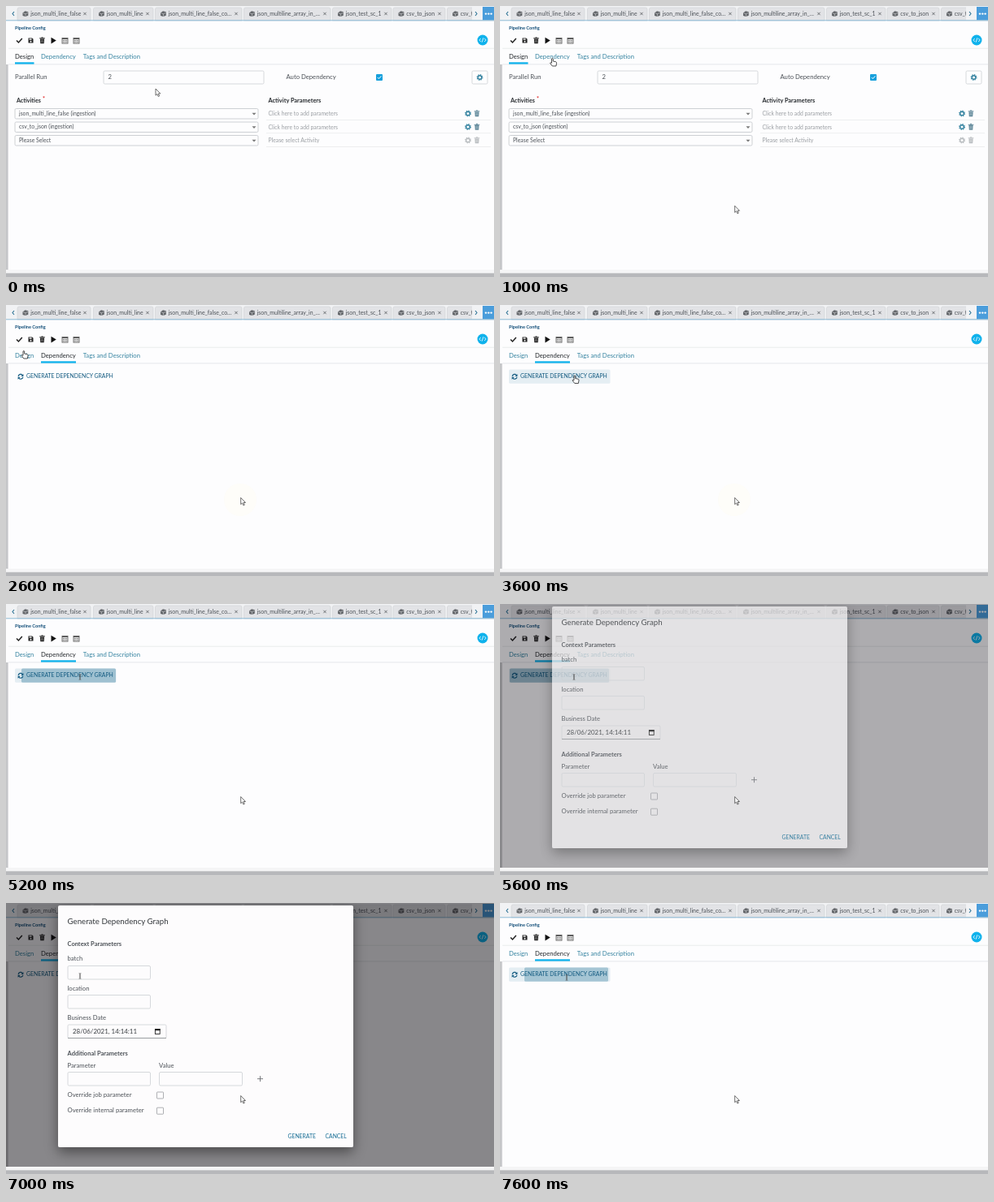
These frames come from a looping animation (600x334 px, 8 s). An HTML page:

```html
<!DOCTYPE html>
<html lang="en">
<head>
<meta charset="utf-8">
<style>
  html, body { margin: 0; width: 100%; height: 100%; overflow: hidden; background: #fdfdfe; }
  svg { display: block; width: 100vw; height: 100vh; font-family: Lato, sans-serif; }
  text { white-space: pre; }
</style>
</head>
<body>
<svg id="stage" viewBox="0 0 600 334" preserveAspectRatio="none"></svg>
<script>
const LOOP = 8000;
const TEAL = '#3583a0', INK = '#4c5157', DARK = '#25292d', NAVY = '#125a80', CYAN = '#0fb2ec';

const text = (x, y, str, size = 7.7, fill = INK, extra = '') =>
  `<text x="${x}" y="${y}" font-size="${size}" fill="${fill}" ${extra}>${str}</text>`;
const bold = (x, y, str, size = 7.5, fill = DARK) => text(x, y, str, size, fill, 'font-weight="700"');
const rect = (x, y, w, h, fill, extra = '') =>
  `<rect x="${x}" y="${y}" width="${w}" height="${h}" fill="${fill}" ${extra}/>`;
const line = (d, stroke, width = 1, extra = '') =>
  `<path d="${d}" fill="none" stroke="${stroke}" stroke-width="${width}" ${extra}/>`;
const shape = (d, fill, extra = '') => `<path d="${d}" fill="${fill}" ${extra}/>`;
const at = (x, y, body, extra = '') => `<g transform="translate(${x} ${y})" ${extra}>${body}</g>`;
const group = (id, body) => `<g id="${id}">${body}</g>`;
const field = (x, y, w, h, stroke = '#ccd0d3') =>
  rect(x + .5, y + .5, w - 1, h - 1, 'none', `rx="1.5" stroke="${stroke}" stroke-width=".8"`);

// Icons are centred on their own origin.
const gear = color =>
  `<circle r="2.3" fill="none" stroke="${color}" stroke-width="1.4"/>` +
  `<circle r="3.4" fill="none" stroke="${color}" stroke-width="1.1" stroke-dasharray="1.4 1.27"/>`;
const trash = color =>
  shape('M-2.6 -2h5.2l-.4 5.7h-4.4z', color) + line('M-3.3 -2.7h6.6M-1 -3.6h2', color, 1) +
  line('M-.8 -1v3.6M.8 -1v3.6', '#fff', .4);
const refresh = line('M-2.9 -.5A3 3 0 0 1 2.4 -1.8M2.9 .5A3 3 0 0 1 -2.4 1.8', NAVY, 1.2) +
  shape('M3.4 -3.4v3h-3zM-3.4 3.4v-3h3z', NAVY);
const calendar = rect(-3.5, -3, 7, 6.6, '#e8e8e8', 'stroke="#666" stroke-width=".9"') +
  line('M-3.5 -2.2h7', '#555', 1.4) + line('M-2.7 0h5.4M-2.7 1.8h5.4', '#777', 1, 'stroke-dasharray="1 .5"');
const jobIcon = shape('M-3.5 -1l3 -2.2 3.8 1v4.4l-3.4 1.4 -3.4 -1z', '#63666a') +
  line('M-3 -.6l3 .8 3 -1.4M0 .2v3', '#d4d5d7', .6);
const close = line('M-1.7 -1.7L1.7 1.7M1.7 -1.7L-1.7 1.7', '#55585c', .8);

function tabBar() {
  const tabs = [
    ['json_multi_line_false', 24, 97], ['json_multi_line', 117.5, 174],
    ['json_multi_line_false_co…', 193.5, 283], ['json_multiline_array_in_…', 302.5, 392],
    ['json_test_sc_1', 411.5, 467], ['csv_to_json', 486, 533], ['csv_t', 552.5, 600]
  ];
  return rect(0, 0, 600, 18, '#f1f2f4') + tabs.map(([name, icon, x]) =>
    shape(`M${icon - 10} 18V4q0 -2 2 -2H${x + 5}q2 0 2 2V18z`, '#e2e3e6', 'stroke="#cfd1d4" stroke-width=".6"') +
    at(icon, 9.5, jobIcon) + text(icon + 6.2, 11.5, name, 6.9) + at(x, 9.5, close)).join('') +
    rect(573, 0, 27, 17.5, '#f1f2f4') +
    line('M10 7l-2 2.5 2 2.5M577 7l2 2.5 -2 2.5', '#2d7396', 1.1) +
    rect(586, 1, 14, 16.5, '#4a9ddb') +
    [590, 593.3, 596.6].map(x => `<circle cx="${x}" cy="9.6" r="1.2" fill="#fff"/>`).join('') +
    rect(0, 17.3, 600, 1, '#8dbbd6');
}

function toolbar() {
  return bold(11, 29.3, 'Pipeline Config', 5.6, '#14507a') +
    line('M13 42.5l2.4 2.5 4.4 -5', '#222', 1.5) +
    at(30.5, 42.5, shape('M-3 -3h4.7l1.3 1.3v4.7h-6z', '#222') + rect(-1.9, -2.2, 3, 1.4, '#fff') +
      '<circle cy="1.2" r="1" fill="#fff"/>') +
    at(44.5, 42.5, trash('#222')) + shape('M55.5 38.8l6.3 3.8 -6.3 3.8z', '#111') +
    at(72.5, 42.5, calendar) + at(86.5, 42.5, calendar) +
    `<circle cx="586" cy="42" r="6.5" fill="${CYAN}"/>` +
    line('M583.8 40l-2 2 2 2M588.2 40l2 2 -2 2M586.9 39.3l-1.8 5.4', '#fff', .8) +
    rect(3, 51.8, 597, .7, '#e0e3e6') + rect(3, 71.6, 597, .7, '#dadde0');
}

function designPage() {
  const rows = [['json_multi_line_false (ingestion)', 126], ['csv_to_json (ingestion)', 142.5], ['Please Select', 159]];
  return text(11, 90, 'Parallel Run') + field(119.5, 79.5, 198, 17) + text(125.5, 90.3, '2') +
    text(344.5, 90, 'Auto Dependency') + rect(455, 84, 8, 8, '#16a0dc', 'rx="1"') +
    line('M456.8 88l1.6 1.6 3 -3.3', '#fff', 1) +
    field(572.5, 79.5, 20, 17) + at(582.5, 88, gear(TEAL)) +
    bold(13, 119, 'Activities', 7.1) + bold(45, 117, '*', 7, '#e02020') +
    bold(322.5, 119, 'Activity Parameters', 7.4) +
    rows.map(([name, y], i) => {
      const empty = i === 2, tint = empty ? '#b9bdc0' : TEAL;
      return field(10.5, y, 300, 13.5, '#c2c6c9') + text(16, y + 8.8, name, 6.85) +
        shape(`M302.5 ${y + 5.8}h5l-2.5 2.8z`, '#777') +
        text(322.5, y + 9.3, empty ? 'Please select Activity' : 'Click here to add parameters', 6.8, '#9a9ea2') +
        at(568, y + 6.5, gear(tint)) + at(579, y + 6.5, trash(empty ? '#b9bdc0' : '#5f8799')) +
        rect(320, y + 14, 276, .6, '#e3e5e7');
    }).join('');
}

function dependencyPage() {
  return rect(11, 79.5, 124.5, 17.3, '#e5eef3', 'id="hover" rx="1.5"') +
    rect(19, 79.5, 116, 17.3, '#9fc1d1', 'id="press" rx="1.5"') +
    at(18, 88.3, refresh) + text(25, 90.3, 'GENERATE DEPENDENCY GRAPH', 6.85, NAVY);
}

function dialogContent() {
  const check = y => rect(185.5, y, 8, 8, 'none', 'rx=".6" stroke="#8b8f93" stroke-width=".7"');
  return text(75.5, 25.7, 'Generate Dependency Graph', 9.7, '#34383c') +
    bold(75.5, 53, 'Context Parameters', 7.5, INK) + text(75.5, 71.3, 'batch') + field(75.5, 77, 102.5, 17.5) +
    text(75.5, 107.8, 'location') + field(75.5, 113, 102.5, 17.5) +
    text(75.5, 144, 'Business Date') + field(75.5, 149.5, 122, 17.5) +
    rect(76, 166, 121, .8, '#8b8f93') + text(82, 160.5, '28/06/2021, 14:14:11', 7.9, '#383c40') +
    rect(183.4, 155.6, 5.8, 5.8, 'none', 'stroke="#222" stroke-width=".9"') + rect(183, 155, 6.6, 2.2, '#222') +
    bold(75.5, 188, 'Additional Parameters', 7.5, INK) +
    text(75.5, 202.6, 'Parameter') + text(188, 202.6, 'Value') +
    field(75.5, 208, 102.5, 17.5) + field(188, 208, 103, 17.5) +
    line('M309 216.7h7M312.5 213.2v7', '#6a6e72', .9) +
    text(75.5, 239, 'Override job parameter') + check(233) +
    text(75.5, 258.4, 'Override internal parameter') + check(252.2) +
    text(346.5, 290, 'GENERATE', 6.8, '#146c94') + text(392.5, 290, 'CANCEL', 6.8, '#146c94');
}

const arrow = shape('M0 0v8.2l1.9 -1.7 1.3 3 1.4 -.6 -1.3 -2.9h2.5z', '#fff', 'stroke="#333" stroke-width=".7"');
const hand = shape('M-1 0q1 -1.2 1.7 0v3l3.5 .8q1 .4 .8 1.6l-.6 3.6h-4.6l-2.8 -3.6q.2 -1.2 2 -.2z',
  '#fff', 'stroke="#222" stroke-width=".8"');
const ibeam = line('M-1.3 -3.4q1.3 0 1.3 .8v5.2q0 .8 -1.3 .8M1.3 -3.4q-1.3 0 -1.3 .8v5.2q0 .8 1.3 .8', '#555', .7);

const stage = document.getElementById('stage');
stage.innerHTML =
  `<defs><filter id="shadow" x="-15%" y="-15%" width="130%" height="130%">
    <feDropShadow dx="0" dy="6" stdDeviation="8" flood-opacity=".45"/></filter></defs>` +
  rect(0, 0, 600, 334, '#fdfdfe') + tabBar() + toolbar() +
  text(11, 64.5, 'Design', 7.7, TEAL, 'id="designTab"') +
  text(43, 64.5, 'Dependency', 7.7, TEAL, 'id="dependencyTab"') +
  text(94.7, 64.5, 'Tags and Description', 7.7, TEAL) +
  rect(11, 69.3, 23.5, 2.3, CYAN, 'id="underline"') +
  group('design', designPage()) + group('dependency', dependencyPage()) +
  rect(0, 72, 2.6, 253, '#c5c6c8') +
  rect(0, 0, 600, 325, '#060307', 'id="shade"') +
  rect(64, 3, 363, 298, '#fdfcfd', 'id="panel" rx="2" filter="url(#shadow)"') +
  group('content', dialogContent()) +
  rect(0, 325, 600, 4.3, '#f5f5f6') + rect(0, 329.3, 600, 4.7, '#b7b8bb') +
  '<circle id="halo" cx="288" cy="240" r="20" fill="#fffbe6" opacity=".25"/>' +
  group('idleArrow', arrow) +
  group('pointer', group('arrow', arrow) + group('hand', hand) + group('ibeam', ibeam));

const el = Object.fromEntries([...stage.querySelectorAll('[id]')].map(node => [node.id, node]));
const set = (id, attrs) => { for (const key in attrs) el[id].setAttribute(key, attrs[key]); };
const show = (id, on) => set(id, { visibility: on ? 'visible' : 'hidden' });
const latest = (keys, t) => keys.filter(key => key[0] <= t).pop();
const ramp = (t, from, to) => Math.min(1, Math.max(0, (t - from) / (to - from)));

const pointerKeys = [
  [0, 'arrow', 184, 102], [200, 'arrow', 128, 80], [300, 'hand', 84, 66],
  [2200, 'hand', 60, 66], [2300, 'hand', 40, 65], [2500, 'hand', 30, 61], [2600, 'hand', 22, 58],
  [2800, 'hand', 26, 84], [3100, 'hand', 60, 86], [3200, 'hand', 95, 88], [3300, 'hand', 115, 88],
  [3500, 'hand', 102, 88], [3600, 'hand', 92, 88.5], [4200, 'ibeam', 91, 90], [7500, 'ibeam', 82, 92]
];
// time, left edge, right edge, opacity
const pressKeys = [[0, 35, 135, 0], [4400, 35, 135, .5], [4700, 27, 135, .7], [4800, 19, 135, 1],
  [5500, 12, 134, 1], [6400, 12, 134, 0], [7400, 30, 133, .9]];
// time, shade opacity, panel opacity
const dialogKeys = [[0, 0, 0], [5500, .14, .3], [5600, .32, .68], [6400, .47, 1],
  [7400, .25, .55], [7500, .08, .2], [7600, 0, 0]];

function render(now) {
  const t = Math.floor(now % LOOP / 100) * 100;
  const onDependency = t >= 1600;
  show('design', !onDependency);
  show('dependency', onDependency);
  set('designTab', { fill: onDependency ? TEAL : DARK });
  set('dependencyTab', { fill: t >= 1500 ? DARK : TEAL });
  const slide = ramp(t, 1400, 1600);
  set('underline', { x: 11 + 32 * slide, width: 23.5 + 19.5 * slide });

  let [, kind, x, y] = latest(pointerKeys, t);
  if (t < 2200) x -= 35 * ramp(t, 500, 1400);
  for (const name of ['arrow', 'hand', 'ibeam']) show(name, name === kind);
  set('pointer', { transform: `translate(${x} ${y - (kind === 'hand' ? 1 : 0)})` });

  show('idleArrow', t >= 600);
  set('idleArrow', { transform: `translate(288.7 ${290 - 52.5 * ramp(t, 500, 1100)})` });
  show('halo', t >= 1100 && t < 5000);

  set('hover', { opacity: t >= 6400 && t < 7400 ? 0 : ramp(t, 3000, 3300) });
  const [, left, right, pressed] = latest(pressKeys, t);
  set('press', { x: left, width: right - left, opacity: pressed });
  const [, shade, opacity] = latest(dialogKeys, t);
  set('shade', { opacity: shade });
  set('panel', { opacity });
  set('content', { opacity: Math.sqrt(opacity) });
}

const start = performance.now();
(function tick() {
  render(performance.now() - start);
  requestAnimationFrame(tick);
})();
</script>
</body>
</html>
```
